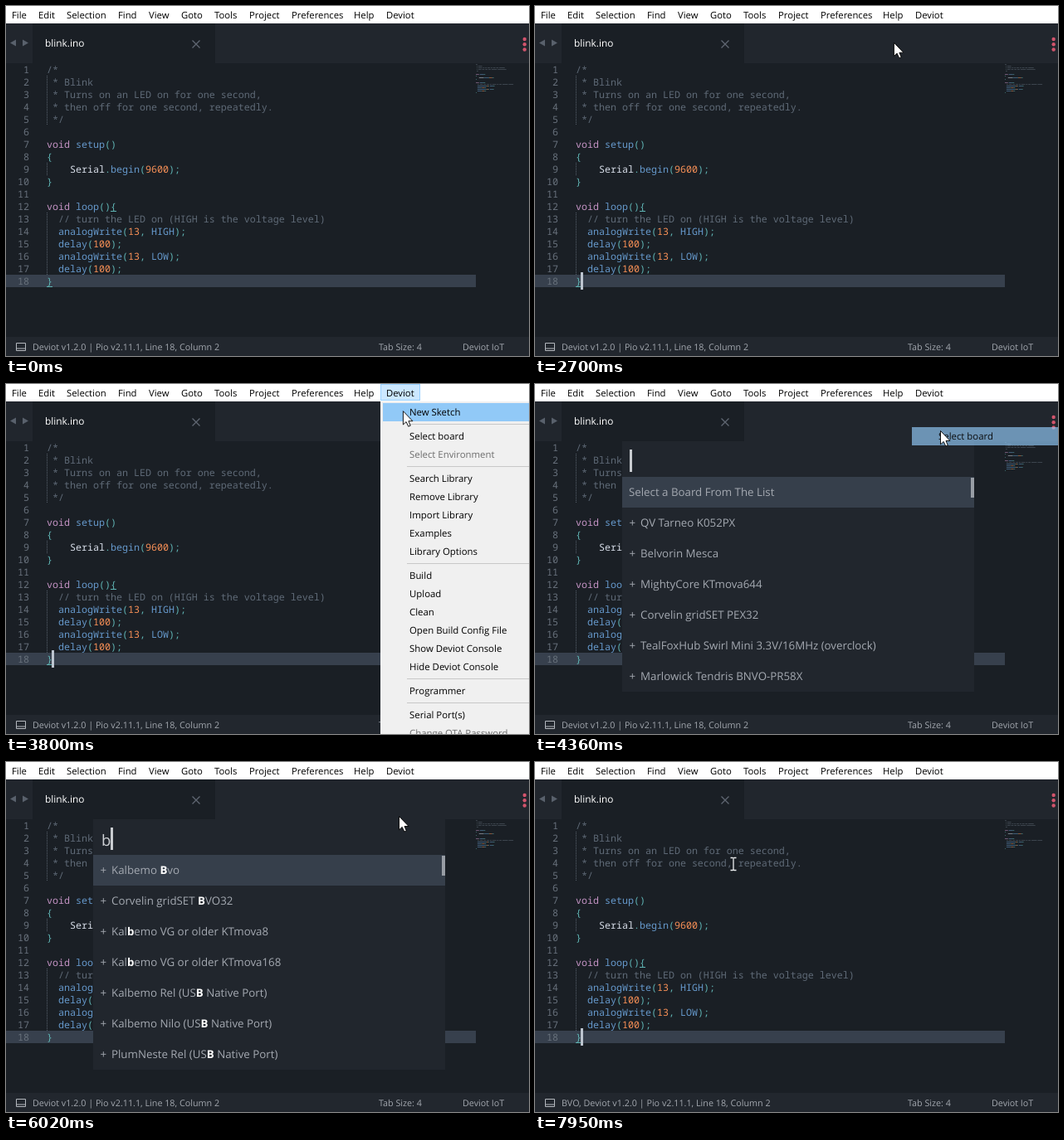
An HTML page that plays this animation: 630x422 px, repeating every 8 s.

```html
<!DOCTYPE html>
<html lang="en">
<head>
<meta charset="utf-8">
<title>Board selection</title>
<style>
html, body { margin: 0; width: 100%; height: 100%; overflow: hidden; background: #1a1f25; }
svg { display: block; width: 630px; height: 422px; }
text { font-family: "Open Sans", "Noto Sans", sans-serif; white-space: pre; text-rendering: geometricPrecision; }
.code { font-family: "Noto Sans Mono", "DejaVu Sans Mono", monospace; font-size: 11.667px; }
.bar { font-size: 11.3px; }
.tab { font-size: 11.9px; fill: #fff; }
.item { font-size: 11.4px; }
.status { font-size: 10.75px; fill: #a2a7ae; }
.row { font-size: 13.3px; fill: #a4a9b1; }
.query { font-size: 18.5px; fill: #d0d3d7; }
.hit { font-weight: 700; fill: #fff; }
</style>
</head>
<body>
<svg id="stage" viewBox="0 0 630 422"></svg>
<script>
const LOOP = 8000;
const BG = '#1a1f25', PANEL = '#21262d', SELECTED = '#363f4b';
const stage = document.getElementById('stage');

function add(parent, tag, attrs = {}, text) {
  const el = document.createElementNS('http://www.w3.org/2000/svg', tag);
  for (const key in attrs) el.setAttribute(key, attrs[key]);
  if (text !== undefined) el.textContent = text;
  parent.appendChild(el);
  return el;
}
const rect = (p, x, y, width, height, fill, more) => add(p, 'rect', { x, y, width, height, fill, ...more });
const label = (p, x, y, text, cls, more) => add(p, 'text', { x, y, class: cls, ...more }, text);
const path = (p, d, more) => add(p, 'path', { d, ...more });
const group = () => add(stage, 'g');
const show = (el, on) => el.setAttribute('visibility', on ? 'visible' : 'hidden');
const fade = (el, a) => el.setAttribute('opacity', a);
const ramp = (t, a, b) => Math.min(1, Math.max(0, (t - a) / (b - a)));
const smooth = u => u * u * (3 - 2 * u);

// Editor
const SOURCE = `/*
 * Blink
 * Turns on an LED on for one second,
 * then off for one second, repeatedly.
 */

void setup()
{
    Serial.begin(9600);
}

void loop(){
  // turn the LED on (HIGH is the voltage level)
  analogWrite(13, HIGH);
  delay(100);
  analogWrite(13, LOW);
  delay(100);
}`.split('\n');

const COMMENT = '#5f6a77';
function colorOf(token) {
  if (token === 'void') return '#c594c5';
  if (token === 'Serial') return '#d8dee9';
  if (/^\d/.test(token)) return '#f99157';
  return /^\w/.test(token) ? '#6699cc' : '#5fb3b3';
}
const tokenize = (line, i) => i < 5 || /^\s*\/\//.test(line)
  ? [[line, COMMENT]]
  : (line.match(/\s+|\w+|[^\w\s]+/g) || []).map(s => [s, colorOf(s)]);

function drawEditor(g) {
  rect(g, 0, 0, 630, 422, BG);
  rect(g, 0, 21, 630, 48, PANEL);
  rect(g, 32, 21, 220, 48, BG);
  path(g, 'M12 40.5V48.5L5 44.5ZM20 40.5V48.5L27 44.5Z', { fill: '#59616c' });
  path(g, 'M224.5 41.5l9 9m0-9l-9 9', { stroke: '#5f6772', 'stroke-width': 1.3 });
  label(g, 47, 49, 'blink.ino', 'tab');
  for (const y of [40, 46.2, 52.5]) add(g, 'circle', { cx: 624.7, cy: y, r: 2.2, fill: '#d2546c' });

  rect(g, 0, 324, 566, 15, '#37404d');
  SOURCE.forEach((line, i) => {
    const y = 81 + 15 * i;
    label(g, 28, y, i + 1, 'code', { fill: '#68717c', 'text-anchor': 'end' });
    const text = label(g, 49, y, undefined, 'code');
    let col = 0;
    for (const [token, fill] of tokenize(line, i)) {
      add(text, 'tspan', { fill }, token);
      for (const word of token.matchAll(/\S+/g))
        rect(g, 566 + (col + word.index) * 0.94, 70 + 2 * i, word[0].length * 0.94, 1, fill, { opacity: 0.5 });
      col += token.length;
    }
  });
  for (const [from, to] of [[84, 144], [189, 204], [249, 324]])
    path(g, `M49.5 ${from}V${to}`, { stroke: '#55606b', 'stroke-dasharray': '1 1' });

  rect(g, 0, 399, 630, 23, '#22272e');
  path(g, 'M12.5 406.5h11v9h-11zM12.5 413h11', { fill: 'none', stroke: '#b4b8be' });
  label(g, 449, 415, 'Tab Size: 4', 'status');
  label(g, 550, 415, 'Deviot IoT', 'status');
}

const editor = group();
drawEditor(editor);
const statusText = label(editor, 32, 415, '', 'status');
const braceMarks = path(editor, 'M126 247.5h7M49 338.5h7', { stroke: '#5fb3b3' });
const caret = rect(editor, 55, 321, 3, 21, '#bcc4cf');

// Menu bar
const menuBar = group();
rect(menuBar, 0, 0, 630, 21, '#fff');
const barHover = rect(menuBar, 451.5, 0.5, 47, 19, '#e5f3ff');
Object.entries({ File: 7, Edit: 39, Selection: 73, Find: 135, View: 172, Goto: 211, Tools: 251,
  Project: 293, Preferences: 344, Help: 419, Deviot: 458 })
  .forEach(([name, x]) => label(menuBar, x, 15, name, 'bar'));

// Board picker
const picker = group();
rect(picker, 105, 69, 424, 302, PANEL);
rect(picker, 105, 112, 424, 37, SELECTED);
const scrollbar = rect(picker, 525, 113, 4, 24, '#989da5');
const rows = add(picker, 'g');
const queryText = label(picker, 115, 101, '', 'query');
const queryCaret = rect(picker, 114, 79, 3, 27, '#c9ccd0');

const QUERY = 'bvo';
const CARET_X = [114, 126, 136, 147];
const BOARDS = ['Select a Board From The List', 'QV Tarneo K052PX', 'Belvorin Mesca', 'MightyCore KTmova644',
  'Corvelin gridSET PEX32', 'TealFoxHub Swirl Mini 3.3V/16MHz (overclock)', 'Marlowick Tendris BNVO-PR58X'];
// An asterisk marks a letter that the query matches.
const MATCHES = ['Kalbemo *B*v*o', 'Corvelin gridSET *B*V*O32', 'Kal*bemo *VG *or older KTmova8',
  'Kal*bemo *VG *or older KTmova168', 'Kalbemo Rel (US*B Nati*ve P*ort)',
  'Kalbemo Nilo (US*B Nati*ve P*ort)', 'PlumNeste Rel (US*B Nati*ve P*ort)'];

let typed = -1;
function setTyped(n) {
  if (n === typed) return;
  typed = n;
  queryText.textContent = QUERY.slice(0, n);
  queryCaret.setAttribute('x', CARET_X[n]);
  rows.replaceChildren();
  (n ? MATCHES : BOARDS).forEach((name, i) => {
    const y = 135 + 37 * i, isTitle = !n && !i;
    if (!isTitle) label(rows, 113.5, y, '+', 'row');
    const text = label(rows, isTitle ? 113 : 127, y, undefined, 'row');
    let hits = 0;
    for (const part of name.match(/\*.|[^*]+/g)) {
      const hit = part[0] === '*' && ++hits <= n;
      add(text, 'tspan', hit ? { class: 'hit' } : {}, part.replace('*', ''));
    }
  });
}

// Drop-down menu: "-" is a separator, "~" a disabled entry
const menu = group();
rect(menu, 451, 21, 179, 401, '#f0f0f0');
const newHover = rect(menu, 454, 23, 176, 22, '#91c9f7');
let rowY = 23;
for (const name of ['New Sketch', '-', 'Select board', '~Select Environment', '-', 'Search Library',
  'Remove Library', 'Import Library', 'Examples', 'Library Options', '-', 'Build', 'Upload', 'Clean',
  'Open Build Config File', 'Show Deviot Console', 'Hide Deviot Console', '-', 'Programmer', '-',
  'Serial Port(s)', '~Change OTA Password']) {
  if (name === '-') {
    rect(menu, 483, rowY + 3, 147, 1, '#c8c8c8');
    rowY += 7;
  } else {
    label(menu, 486, rowY + 15, name.replace('~', ''), 'item', { fill: name[0] === '~' ? '#6d6d6d' : '#000' });
    rowY += 22;
  }
}

const choice = group();
rect(choice, 454, 52, 176, 22, '#91c9f7');
label(choice, 486, 67, 'Select board', 'item');

// Mouse
const mouse = group();
const arrow = path(mouse, 'M-.5-.5V15.8L3.2 12.4L5.8 18L8.3 17L6 11.5H11Z',
  { fill: '#fff', stroke: '#000', 'stroke-width': 0.9 });
const beam = path(mouse, 'M-3.5-7.5H-1L0-6.8L1-7.5H3.5M0-7V7M-3.5 7.5H-1L0 6.8L1 7.5H3.5',
  { fill: 'none', stroke: '#eceef0', 'stroke-width': 1.3 });
const TRACK = [[820, 335, 371], [1600, 367, 150], [1650, 367, 150], [2420, 394, 88], [2470, 394, 88],
  [2900, 464, 10], [3660, 464, 10], [3910, 489, 49], [4040, 489, 49], [4180, 489, 57],
  [5040, 489, 57], [5130, 474, 66], [6850, 474, 66], [7220, 239, 123], [LOOP, 239, 123]];

function mouseAt(t) {
  const i = Math.max(1, TRACK.findIndex(p => t < p[0]));
  const [a, b] = [TRACK[i - 1], TRACK[i]];
  const u = smooth(ramp(t, a[0], b[0]));
  return [a[1] + (b[1] - a[1]) * u, a[2] + (b[2] - a[2]) * u];
}

function caretAlpha(t) {
  if (t < 400) return 0;
  if (t >= 4360) return t >= 7950 ? 1 : 0;
  const phase = (t - 400) % 1000;
  return ramp(phase, 0, 130) - ramp(phase, 440, 560);
}

function render(t) {
  const pickerOpen = t >= 4360 && t < 7590;
  const menuOpen = t >= 3030 && t < 4360;
  fade(caret, caretAlpha(t));
  show(braceMarks, !pickerOpen);
  statusText.textContent = (t >= 7590 ? 'BVO, ' : '') + 'Deviot v1.2.0 | Pio v2.11.1, Line 18, Column 2';

  const [x, y] = mouseAt(t);
  const isBeam = t < 4360 ? !menuOpen && y > 69 : t >= 7650;
  mouse.setAttribute('transform', `translate(${x.toFixed(1)} ${y.toFixed(1)})`);
  show(mouse, t >= 840);
  fade(arrow, isBeam ? 0 : 1);
  fade(beam, isBeam ? 1 : 0);

  show(barHover, t < 4360 && x > 451 && y < 21 || menuOpen);
  barHover.setAttribute('fill', menuOpen ? '#cce8ff' : '#e5f3ff');
  barHover.setAttribute('stroke', menuOpen ? '#99d1ff' : '#cce8ff');

  show(menu, menuOpen);
  fade(menu, ramp(t, 3030, 3165));
  fade(newHover, y >= 23 && y < 45 ? 1 : 0);
  show(choice, t >= 4070 && t < 4620);
  fade(choice, t < 4360 ? 1 : 0.67 * (1 - ramp(t, 4380, 4600)));

  show(picker, pickerOpen);
  setTyped([5780, 6270, 6690].filter(k => t >= k).length);
  fade(queryCaret, 1 - ramp(t, 4760, 4890) + ramp(t, 5350, 5490) - ramp(t, 7090, 7220));
  fade(scrollbar, 1 - ramp(t, 4640, 4890) + ramp(t, 5770, 5840) - ramp(t, 6880, 7220));
}

function tick() {
  render(performance.now() % LOOP);
  requestAnimationFrame(tick);
}
tick();
</script>
</body>
</html>
```
